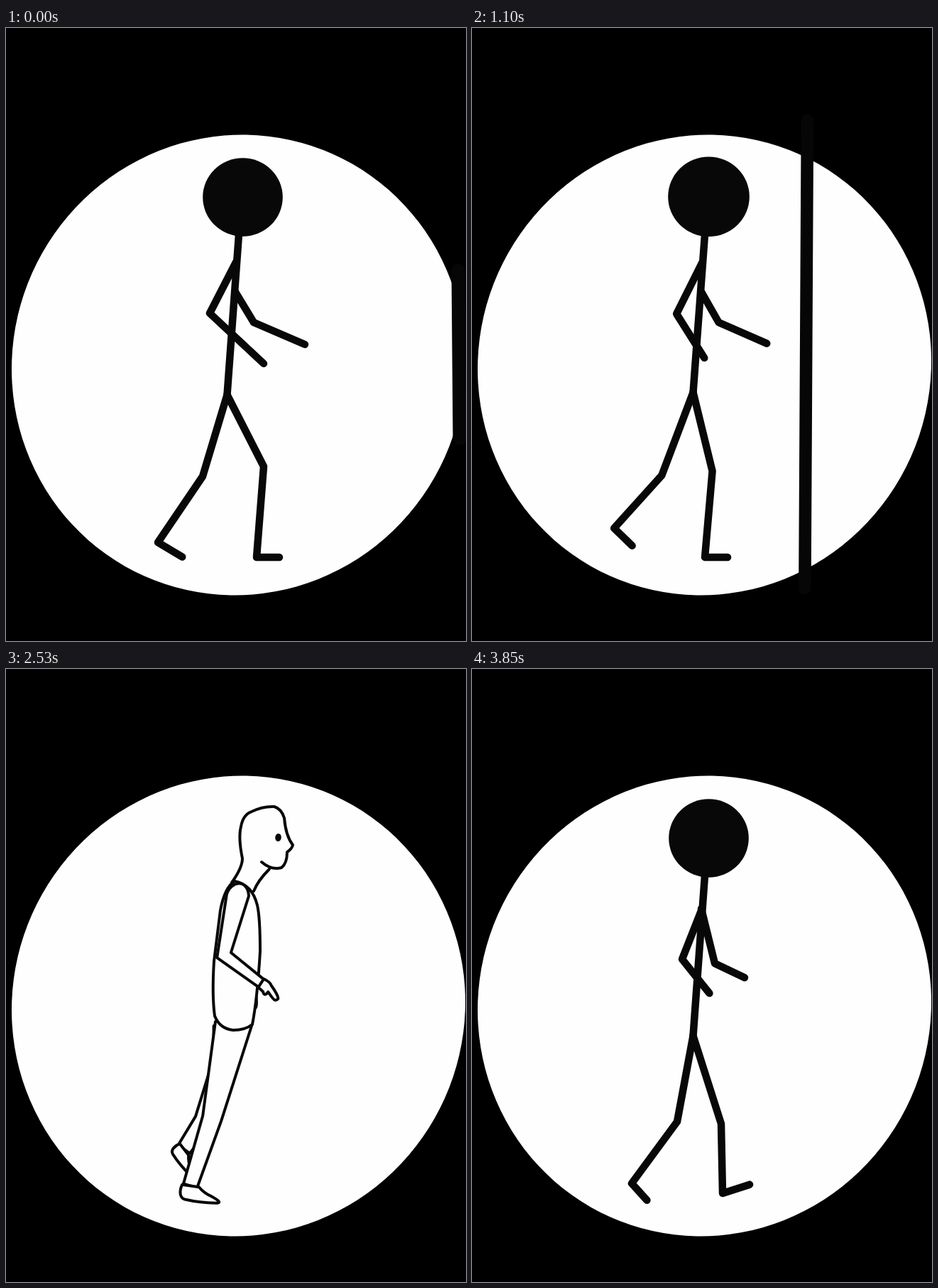
These frames come from a looping animation (648x864 px, 3.96 s). An HTML page with a canvas:

```html
<!DOCTYPE html>
<html lang="en">
<head>
<meta charset="utf-8">
<title>Walker</title>
<style>
html, body { margin: 0; width: 100%; height: 100%; overflow: hidden; background: #000; }
canvas { display: block; width: 648px; height: 864px; }
</style>
</head>
<body>
<canvas id="stage" width="648" height="864"></canvas>
<script>
const ctx = document.getElementById('stage').getContext('2d');
const STEP = 110, COUNT = 36, CYCLE = 9;
const BAR_END = 21, STICK_AGAIN = 33;
const INK = '#080808', PAPER = '#fefefe';

const HEAD = new Path2D('M318 303Q333 282 333 269Q327 240 331 224Q334 207 346 203Q362 195 378 196Q388 199 392 212Q394 237 404 250Q403 255 396 260Q396 276 388 282Q374 286 360 274M371 284Q355 300 349 315');
const TORSO = new Path2D('M322 299Q308 308 302 340L293 412Q290 460 294 489Q301 507 320 509Q337 509 347 501Q354 465 358 398Q358 350 354 333Q347 304 322 299Z');
const FOOT = new Path2D('M-12 0C-15 10 -13 20 -5 21Q20 23 44 19Q50 17 34 11Q22 8 13 0Z');
const HAND = new Path2D('M-2 -7Q8 -9 12 -6Q28 -1 31 3Q31 9 24 7L14 4Q14 13 8 8L-1 7Z');

const mix = (a, b, k) => a + (b - a) * k;
const rad = deg => deg * Math.PI / 180;
const arc = u => Math.sin(Math.PI * u);
const smooth = k => {
  k = Math.min(1, Math.max(0, k));
  return k * k * (3 - 2 * k);
};
const bezier = (a, b, c, d, u) => {
  const v = 1 - u;
  return a * v ** 3 + 3 * b * v * v * u + 3 * c * v * u * u + d * u ** 3;
};

function line(...pts) {
  ctx.beginPath();
  pts.forEach(p => ctx.lineTo(...p));
  ctx.stroke();
}

function disc(x, y, rx, ry, turn, color) {
  ctx.fillStyle = color;
  ctx.beginPath();
  ctx.ellipse(x, y, rx, ry, turn, 0, 7);
  ctx.fill();
}

// Each leg runs through one step in eight phases
function stance(p) {
  const u = p / 8, k = 1 - (1 - u) ** 3;
  return {
    knee: [363 - 74 * k, 618 + 20 * k],
    ankle: [353 - 128 * Math.sin(u * Math.PI / 2), 746 - 21 * u ** 4],
    turn: rad(48) * u ** 3,
    toe: 32
  };
}

function swing(p) {
  const u = p / 8;
  return {
    knee: [bezier(277, 244, 270, 351, u), bezier(632, 624, 650, 641, u)],
    ankle: [bezier(214, 158, 262, 353, u), bezier(725, 663, 673, 739, u)],
    turn: rad(mix(31, -18, u) + 50 * arc(u)),
    toe: 40 - 12 * arc(u)
  };
}

function stickLeg(hip, { knee, ankle, turn, toe }) {
  line(hip, knee, ankle, [ankle[0] + toe * Math.cos(turn), ankle[1] + toe * Math.sin(turn)]);
}

function stickArm(p) {
  const u = p / 8;
  ctx.lineWidth = 10.5;
  line([324, 330 + 8 * u], [287 + 9 * u, 402 + 7 * u],
    [324 + 1.3 * p + 39 * .05 ** p, 457 + 16 * .5 ** p]);
}

function stick(p) {
  const u = p / 8, pull = smooth(2 * u), r = 56.3 + 2.7 * arc(u);
  const hip = [311.5, 517 - 9 * arc(u)];
  disc(333.5, 238.5 - 2 * arc(u), r, r - 1, 0, INK);
  ctx.lineWidth = 10.5;
  line([328, 291], hip);
  line([323, 372 - 34 * u ** 3], [349 - 18 * pull + 11 * u, 415], [421 - 37 * pull, 446 - 11 * u]);
  stickLeg(hip, stance(p));
  stickLeg(hip, swing(p));
}

function part(path, x, y, turn, size) {
  ctx.save();
  ctx.translate(x, y);
  ctx.rotate(turn);
  ctx.scale(size, size);
  ctx.lineWidth = 4 / size;
  ctx.fill(path);
  ctx.stroke(path);
  ctx.restore();
}

// Tapered limb from two root points over a joint to its end
function limb(back, front, mid, end, midR, endR, round) {
  const unit = (x, y) => [x / Math.hypot(x, y), y / Math.hypot(x, y)];
  const off = (p, d, r) => [p[0] - d[1] * r, p[1] + d[0] * r];
  const u = unit(mid[0] - (back[0] + front[0]) / 2, mid[1] - (back[1] + front[1]) / 2);
  const v = unit(end[0] - mid[0], end[1] - mid[1]);
  const w = unit(u[0] + v[0], u[1] + v[1]);
  ctx.beginPath();
  [back, off(mid, w, midR), off(end, v, endR), off(end, v, -endR), off(mid, w, -midR), front]
    .forEach(p => ctx.lineTo(...p));
  if (round) ctx.bezierCurveTo(341, 297, 318, 297, ...back);
  ctx.fill();
  ctx.stroke();
  return Math.atan2(v[1], v[0]);
}

// s: 0 reaching forward, 1 swung back
function arm(s, far) {
  const elbow = [Math.max(mix(350, 292, s), far ? 318 : 0), mix(410, 401, s)];
  const wrist = [mix(416, 341, s), mix(431, 448, s)];
  const turn = limb([311, 317], [342, 320], elbow, wrist, far ? 14 : 10.5, 6.5, true);
  part(HAND, ...wrist, turn, 1);
}

function leg({ knee, ankle, turn }, shift, far) {
  const kx = knee[0] + shift;
  const x = ankle[0] + 10 - .05 * (ankle[0] - 214) + shift / 2;
  const y = ankle[1] - 17 + 10 * Math.sin(turn);
  limb([295, far ? 540 : 497], [far ? Math.min(346, kx + 13) : 346, 503],
    [kx, knee[1] - 3], [x, y], 13.5, 10);
  part(FOOT, x, y, turn, mix(1, .8, smooth(turn * 2)));
}

function flesh(n) {
  const p = n % CYCLE, even = Math.floor(n / CYCLE) % 2 === 0;
  const legs = [[stance(p * .9), n < BAR_END ? 14 : -5], [swing(p * .9), 3]];
  const arms = [smooth((p - 2) / 4.5), 1 - smooth((p - 5) / 4)];
  if (!even) { legs.reverse(); arms.reverse(); }

  ctx.fillStyle = PAPER;
  ctx.lineWidth = 4;
  arm(arms[1], true);
  leg(...legs[1], true);
  leg(...legs[0], false);
  part(HEAD, 0, -2 * arc(p / CYCLE), 0, 1);
  disc(383.5, 237.5, 4.3, 5.6, .1, INK);
  ctx.fillStyle = PAPER;
  part(TORSO, 0, 0, 0, 1);
  arm(arms[0], false);
}

function clipped(edge, top, bottom, paint, value) {
  ctx.save();
  ctx.beginPath();
  [[edge, 0], [top, 0], [bottom, 864], [edge, 864]].forEach(p => ctx.lineTo(...p));
  ctx.clip();
  paint(value);
  ctx.restore();
}

function draw(n) {
  const p = n % CYCLE;
  ctx.fillStyle = '#000';
  ctx.fillRect(0, 0, 648, 864);
  disc(327.5, 475, 318.3, 325.7, rad(24), PAPER);
  ctx.strokeStyle = INK;
  ctx.lineCap = ctx.lineJoin = 'round';

  if (n > BAR_END) {
    if (n < STICK_AGAIN) flesh(n);
    else { stick(p); stickArm(p); }
    return;
  }

  const x = 638 - 14.08 * n ** 1.075;
  const lean = 4 * Math.sin(n / 13) - 1;
  const half = 40 + 324 * Math.sqrt(1 - ((x - 327.5) / 320) ** 2);
  clipped(700, x + lean, x - lean, flesh, n);
  clipped(-50, x + lean, x - lean, stick, p);
  ctx.strokeStyle = '#060606';
  ctx.lineWidth = 19 - n / 7;
  line([x + lean, 460 - half], [x - lean, 460 + half]);
  ctx.strokeStyle = INK;
  // The near arm stays in front until the bar has passed its elbow
  if (x > 295) stickArm(p);
}

const start = performance.now();
function tick() {
  draw(Math.floor((performance.now() - start) / STEP) % COUNT);
  requestAnimationFrame(tick);
}
tick();
</script>
</body>
</html>
```
